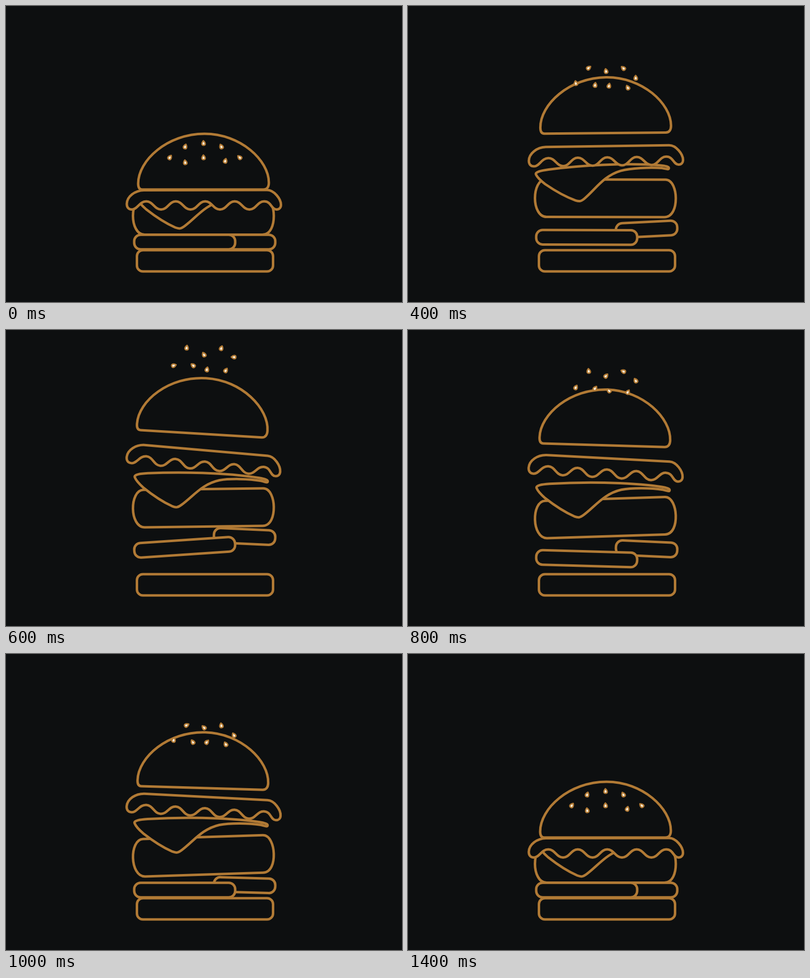
An HTML page with a canvas that plays this animation: 800x600 px, repeating every 2.4 s.

```html
<!DOCTYPE html>
<html lang="en">
<head>
<meta charset="utf-8">
<title>Burger</title>
<style>
html, body { margin: 0; width: 100%; height: 100%; overflow: hidden; background: #0d0f10; }
canvas { display: block; }
</style>
</head>
<body>
<canvas id="stage" width="800" height="600"></canvas>
<script>
const ctx = document.getElementById('stage').getContext('2d');
const BG = '#0d0f10', LINE = '#b17a35', SEED = '#fff3df';
const LOOP = 2400, STEP = 100, APEX = 600;

const clamp = v => Math.min(1, Math.max(0, v));

// Rounded bar centred on the pivot
function bar(w, h, r) {
  const p = new Path2D();
  p.roundRect(-w / 2, -h / 2, w, h, r);
  return p;
}

// Path in stage coordinates, moved so the pivot is the origin
function shape(d, x, y) {
  const p = new Path2D();
  p.addPath(new Path2D(d), new DOMMatrix([1, 0, 0, 1, -x, -y]));
  return p;
}

// Lettuce: flat top, two lobes and a wavy lower edge
function lettuce() {
  const gap = 29.75, k = gap * 0.45;
  let d = 'M278 373.5 L527 373 C541 373 555 391 555 403 C555 409 551 412.5 546 412.5 C535 412.5 536 396 521 396';
  for (let i = 1; i <= 8; i++) {
    const x = 521 - i * gap;
    const [from, to] = i % 2 ? [396, 412.5] : [412.5, 396];
    d += ` C${x + gap - k} ${from} ${x + k} ${to} ${x} ${to}`;
  }
  d += ' C269 396 265 412.5 254 412.5 C247 412.5 243.5 408 243.5 401 C244 386 260 374 278 373.5 Z';
  return shape(d, 399, 392);
}

const patty = shape('M278 387 L520 387 C535 387 541 409 541 425 C541 443 535 463 518 463 ' +
  'L280 463 C264 463 256.5 443 256.5 425 C256.5 406 264 387 278 387 Z', 399, 425);

const cheese = shape('M259 322 C256 316 270 314 285 313 C350 309 440 309 510 319 C522 321 528 323 527.5 326 ' +
  'C527 329.5 522 327 514 325 C490 321 450 321 430 325 C395 333 378 358 354 376 C346 382 343 382 335 379 ' +
  'C310 368 290 353 276 342 C267 334 261 327 259 322 Z', 395, 345);

const dome = shape('M275 372 C269 372 267 367 267 360 C267 313 326 259 401 259 C474 259 531 313 531 358 ' +
  'C531 367 527 372 520 372 Z', 399, 316);

// Back to front. up: [start, power], down: [landing, power],
// tilt: [wobble going up, lean at the apex, lean coming down]
const layers = [
  { path: bar(275, 43, 12), x: 402, y: 516.5, height: 0, up: [0, 1], down: [1400, 1], tilt: [0, 0, 0] },
  { path: bar(124, 29.5, 13), x: 482, y: 478.5, height: 60, up: [247, 1], down: [1080, 1], tilt: [-0.05, 0.047, 0.045] },
  { path: bar(204, 29.5, 13), x: 361, y: 478.5, height: 38, up: [333, 1], down: [930, 1], tilt: [0, -0.067, 0.03] },
  { path: patty, x: 399, y: 425.5, height: 65, up: [155, 1], down: [1100, 1.3], tilt: [0, -0.013, -0.032] },
  { path: cheese, x: 396, y: 415, height: 91, slide: 6, up: [0, 1.08], down: [1400, 1.1], tilt: [-0.07, 0.015, 0] },
  { path: lettuce(), x: 399.5, y: 392, height: 129.5, up: [0, 0.92], down: [1400, 1.5], tilt: [0, 0.09, 0.055] },
  { path: dome, x: 399, y: 316, height: 161.5, up: [0, 0.85], down: [1400, 1.4], tilt: [0, 0.06, 0.03] }
];

// Seeds: resting point and highest point
const seeds = [
  [331, 307, 339, 72], [362, 285, 365, 36], [399, 278, 400, 50], [435, 285, 435, 37],
  [472, 307, 460, 55], [443, 314, 444, 82], [399, 307, 406, 80], [362, 317, 378, 72]
];
const seedPath = new Path2D('M0 -5 C2 -3 3.4 -0.5 3.4 1.6 C3.4 5.4 -3.4 5.4 -3.4 1.6 C-3.4 -0.5 -2 -3 0 -5 Z');

// Share of the full height: 0 at rest, 1 at the apex
function lift(t, [start, rise], [land, fall]) {
  return t < APEX
    ? clamp((t - start) / (APEX - start)) ** rise
    : 1 - clamp((t - APEX) / (land - APEX)) ** fall;
}

// Sways on the way up, settles into a second lean on the way down
function lean(t, up, height, [wobble, apex, back]) {
  if (t < APEX) {
    const sway = 0.4 + 0.6 * Math.cos((t - APEX) / 200 * Math.PI);
    return apex * up * sway + wobble * Math.sin(Math.PI * up);
  }
  const turn = clamp((t - APEX) / 200);
  return (apex + (back - apex) * turn) * clamp(up * height / 16);
}

function place(path, x, y, angle, fill, width) {
  ctx.save();
  ctx.translate(x, y);
  ctx.rotate(angle);
  ctx.fillStyle = fill;
  ctx.lineWidth = width;
  ctx.fill(path);
  ctx.stroke(path);
  ctx.restore();
}

function drawLayer({ path, x, y, height, slide = 0, up, down, tilt }, t) {
  const p = lift(t, up, down);
  const dx = slide * (1 - clamp(p * 3));
  place(path, x + dx, y - height * p, lean(t, p, height, tilt), BG, 5);
}

function drawSeed([x, y, topX, topY], i, t) {
  const p = lift(t, [0, 1.1], [1400, 1.2]);
  const rest = (392 - x) / 100 * (y > 310 ? -0.5 : 1);
  const spin = 0.8 * Math.sin(i * 2.4 + t * 0.012) * clamp(p * 3);
  place(seedPath, x + (topX - x) * clamp(p * 1.7), y + (topY - y) * p, rest + spin, SEED, 2.7);
}

function draw(t) {
  ctx.fillStyle = BG;
  ctx.fillRect(0, 0, 800, 600);
  ctx.strokeStyle = LINE;
  ctx.lineJoin = 'round';
  layers.forEach(l => drawLayer(l, t));
  seeds.forEach((s, i) => drawSeed(s, i, t));
}

const start = performance.now();
function tick() {
  const t = (performance.now() - start) % LOOP;
  draw(Math.floor(t / STEP) * STEP);
  requestAnimationFrame(tick);
}
tick();
</script>
</body>
</html>
```
